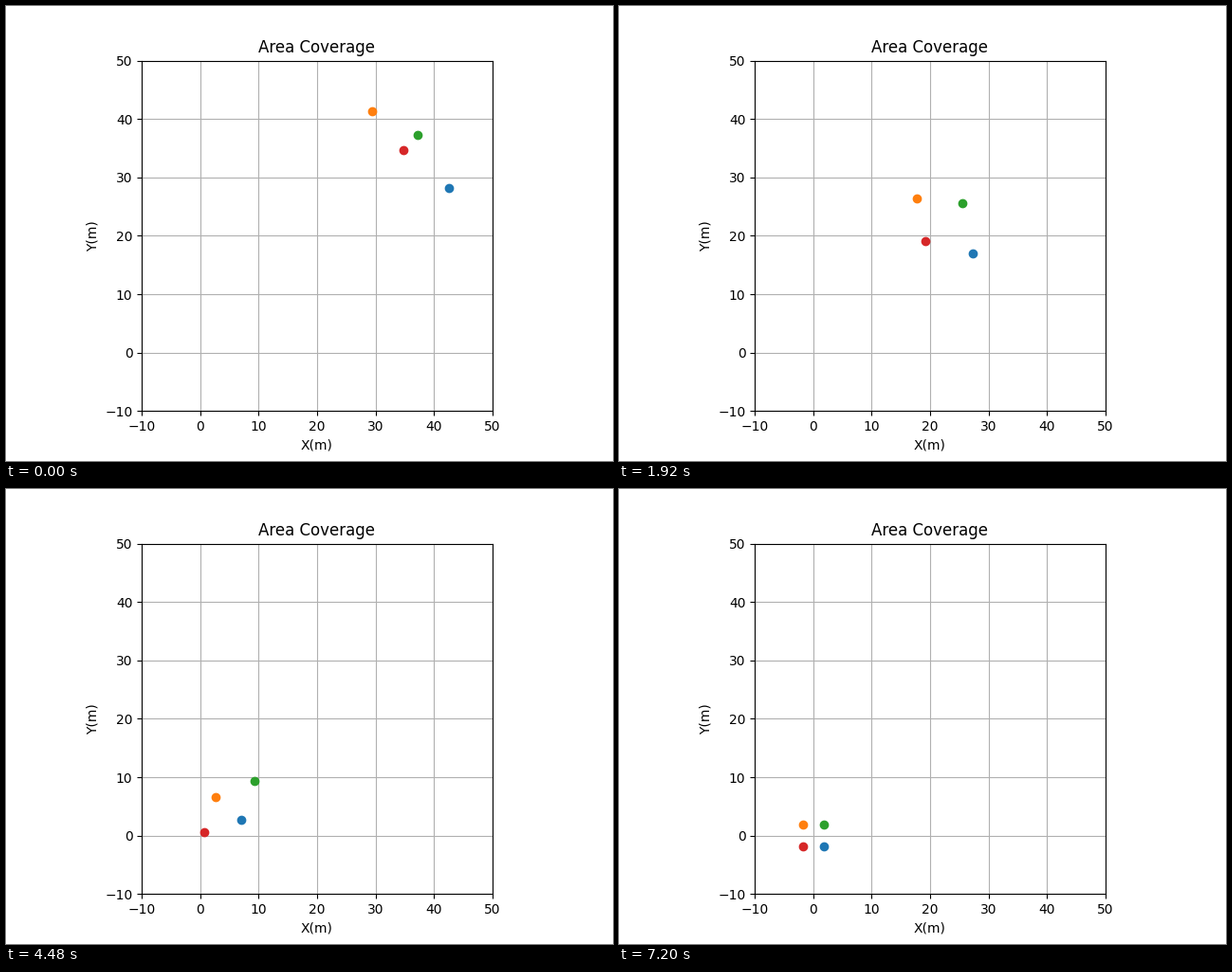
Animation of 640 by 480 pixels, one loop 9600 ms. Source, as a matplotlib script:

```python
import numpy as np
import matplotlib.pyplot as plt
from matplotlib.animation import FuncAnimation

STEP = 20          # ms per frame
FRAMES = 480       # one loop of 9600 ms
PUSH_TIME = 0.3    # s, how quickly the opening push fades

# Metres and seconds: colour, start, slot in the square, cruise speed per axis,
# opening push toward the slot per axis, braking distance
ROBOTS = [
    ("tab:blue", (42.57, 28.18), (1.82, -1.85), (7.99, 5.68), (0, 0.32), 3.5),
    ("tab:orange", (29.42, 41.33), (-1.88, 1.85), (5.97, 7.82), (0.3, 0), 3.5),
    ("tab:green", (37.21, 37.27), (1.82, 1.88), (6.4, 6.4), (-0.65, -0.65), 3.25),
    ("tab:red", (34.77, 34.68), (-1.79, -1.85), (7.79, 7.79), (0.65, 0.65), 4.2),
]


def approach(start, goal, speed, push, brake, t):
    """Cruise at a steady speed, then brake exponentially into the goal."""
    pushed = push * (1 - np.exp(-t / PUSH_TIME))
    left = start - goal - pushed - speed * t
    return goal + brake * np.arcsinh(0.5 * np.exp(left / brake))


fig, ax = plt.subplots(figsize=(6.4, 4.8), dpi=100)
ax.set_aspect("equal")
ax.set(xlim=(-10, 50), ylim=(-10, 50), title="Area Coverage",
       xlabel="X(m)", ylabel="Y(m)")
ax.set_xticks(range(-10, 51, 10))
ax.set_yticks(range(-10, 51, 10))
ax.grid(True)

dots = [ax.plot([], [], "o", color=robot[0])[0] for robot in ROBOTS]


def update(n):
    t = n * STEP / 1000
    for dot, (_, start, slot, speed, push, brake) in zip(dots, ROBOTS):
        x, y = (approach(*axis, brake, t)
                for axis in zip(start, slot, speed, push))
        dot.set_data([x], [y])
    return dots


anim = FuncAnimation(fig, update, frames=FRAMES, interval=STEP,
                     repeat=True, repeat_delay=0)
plt.show()
```
